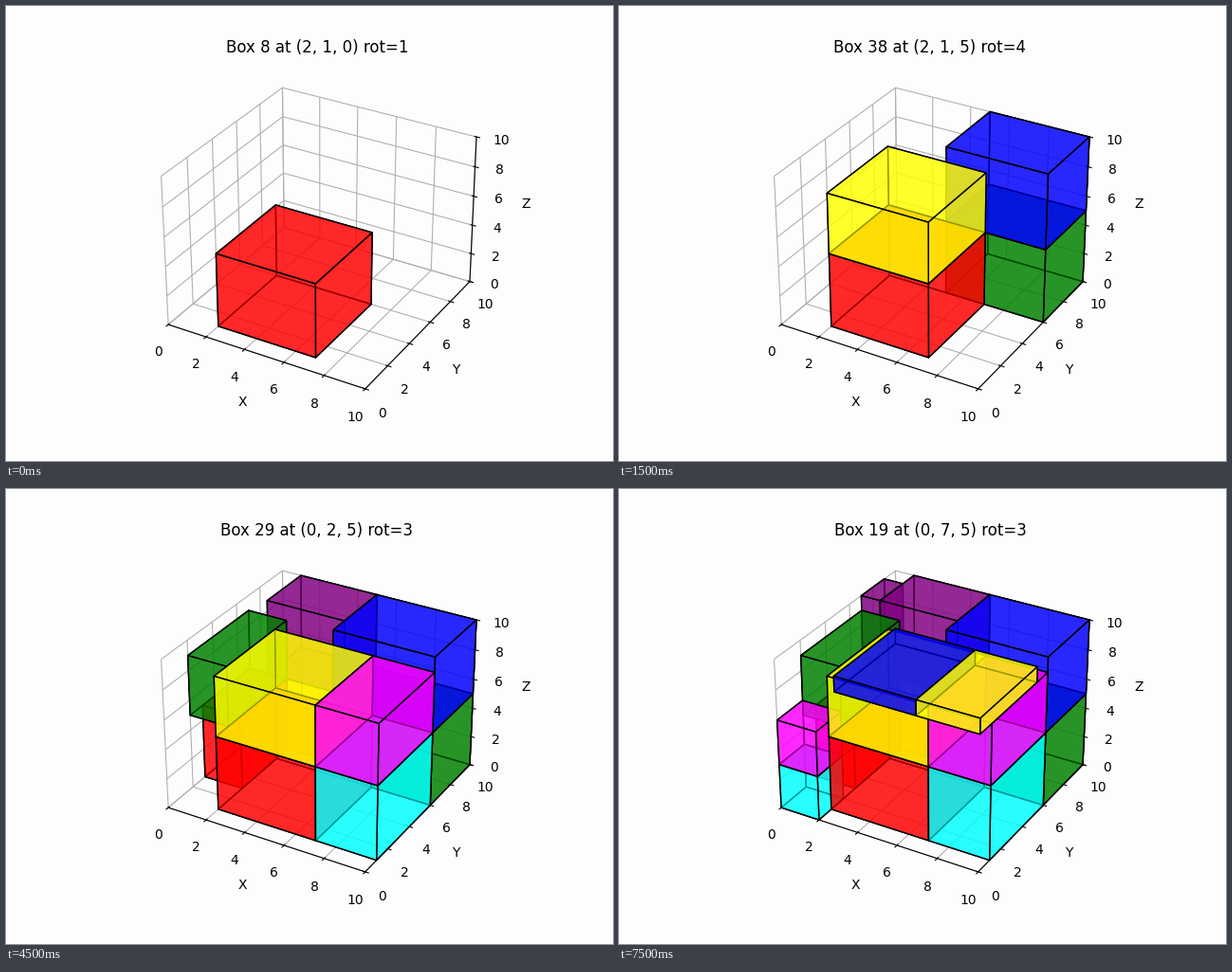
Recreate the animation shown at these times as a matplotlib script. Size 640x480 px, loop 8 s.

```python
import matplotlib.pyplot as plt
import numpy as np
from itertools import cycle, product
from matplotlib.animation import FuncAnimation
from mpl_toolkits.mplot3d.art3d import Poly3DCollection

PAPER = "#fdfdfd"
SIDE = 10
COLORS = ["red", "green", "blue", "yellow", "cyan", "magenta", "orange", "purple"]

# Footprints: x, y, width, depth
FRONT_LEFT, FRONT_RIGHT = (2, 1, 5, 5), (7, 1, 3, 5)
BACK_RIGHT, BACK_MID, BACK_LEFT = (5, 6, 5, 4), (1, 7, 4, 3), (0, 7, 1, 2)
LID_LEFT, LID_RIGHT = (3, 0, 4, 5), (7, 0, 3, 5)
WALL_LOW, WALL_HIGH = (0, 3, 2, 4), (0, 2, 2, 5)
CORNER = (0, 0, 2, 2)

DROPS = [
    FRONT_LEFT, BACK_RIGHT, BACK_RIGHT, FRONT_LEFT, FRONT_RIGHT, FRONT_RIGHT,
    BACK_MID, BACK_MID, WALL_LOW, WALL_HIGH, LID_LEFT, LID_RIGHT,
    CORNER, CORNER, BACK_LEFT, BACK_LEFT,
]
IDS = [8, 26, 25, 38, 27, 22, 36, 40, 20, 29, 23, 35, 30, 33, 17, 19]


def stack(drops):
    """Let each box rest on whatever already lies under its footprint."""
    ground = np.zeros((SIDE, SIDE), int)
    for x, y, w, d in drops:
        under = ground[x:x + w, y:y + d]
        z = int(under.max())
        tallest = 5 if y else 3
        ceiling = SIDE - 1 if 0 < y < 6 else SIDE
        h = min(tallest, ceiling - z)
        under[:] = z + h
        yield (x, y, z), (w, d, h)


def rotation(w, d, h):
    if w == d == h:
        return 1
    return 3 if w < h else 4


def box_faces(corner, size):
    """Six quads of an axis-aligned box."""
    ring = [(0, 0), (1, 0), (1, 1), (0, 1)]
    faces = []
    for axis, side in product(range(3), (0, 1)):
        unit = [np.insert(p, axis, side) for p in ring]
        faces.append(np.array(corner) + np.array(unit) * size)
    return faces


fig = plt.figure(figsize=(6.4, 4.8), dpi=100, facecolor=PAPER)
ax = fig.add_subplot(projection="3d", facecolor=PAPER)

solids, titles = [], []
for number, (corner, size), color in zip(IDS, stack(DROPS), cycle(COLORS)):
    solid = Poly3DCollection(
        box_faces(corner, size),
        facecolors=color,
        edgecolors="black",
        linewidths=1,
        alpha=0.6,
    )
    solids.append(ax.add_collection3d(solid))
    titles.append(f"Box {number} at {corner} rot={rotation(*size)}")

span = (0, SIDE)
ax.set(xlim=span, ylim=span, zlim=span, xlabel="X", ylabel="Y", zlabel="Z")
for axis in (ax.xaxis, ax.yaxis, ax.zaxis):
    axis.set_pane_color(PAPER)


def update(step):
    for i, solid in enumerate(solids):
        solid.set_visible(i <= step)
    ax.set_title(titles[step])
    return solids


anim = FuncAnimation(
    fig, update, frames=len(solids), interval=500, repeat=True, repeat_delay=0
)
plt.show()
```
